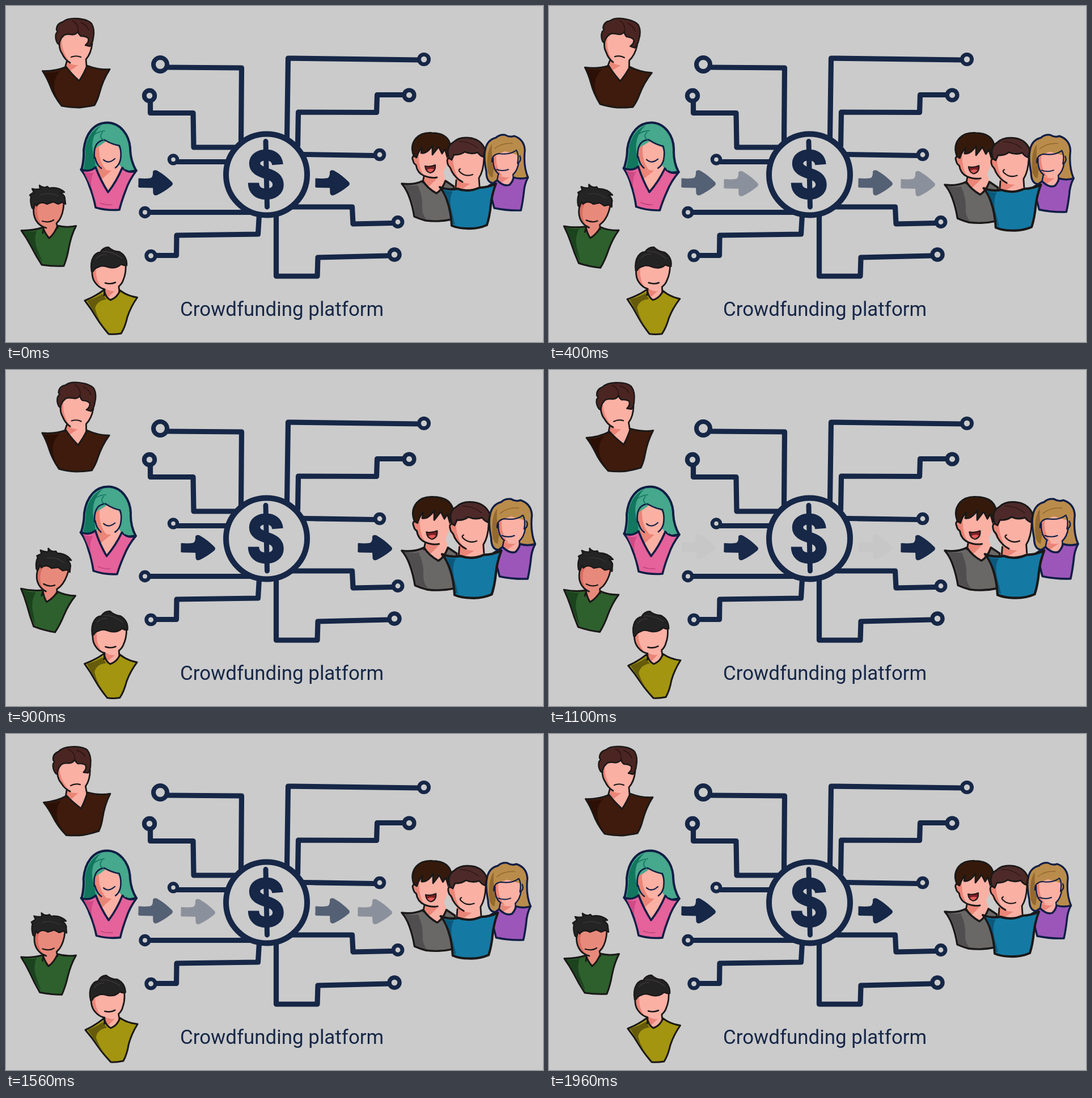
Animation of 947x592 px, one loop 2000 ms. Source, as an HTML page:

```html
<!DOCTYPE html>
<html lang="en">
<head>
<meta charset="utf-8">
<title>Crowdfunding platform</title>
<style>
html, body { margin: 0; width: 100%; height: 100%; overflow: hidden; background: #cbcbcb; }
svg { display: block; width: 947px; height: 592px; }
text { font: 34.9px Roboto, sans-serif; fill: #162747; }
</style>
</head>
<body>
<svg id="stage" viewBox="0 0 947 592"></svg>
<script>
const NAVY = '#162747', INK = '#1a1818', BG = '#cbcbcb', DEEP = '#101e45';
const SKIN = '#fbb0a4', BLUSH = '#ea8577';

const fill = (d, color) => `<path d="${d}" fill="${color}"/>`;
const line = (d, w = 2.8, color = INK) =>
  `<path d="${d}" fill="none" stroke="${color}" stroke-width="${w}"/>`;
const shape = (d, color, w = 3.4, ink = INK) =>
  `<path d="${d}" fill="${color}" stroke="${ink}" stroke-width="${w}"/>`;
const group = (id, ...parts) =>
  `<g id="${id}" stroke-linejoin="round" stroke-linecap="round">${parts.join('')}</g>`;

// Circuit: x, y, outer radius, ring width, then the wire
const wires = [
  [272, 103, 16, 8, 'M284 108L415.5 109L414.5 240'],
  [253, 158, 13.2, 8, 'M254.5 168V188.5H330L331 249H406'],
  [295, 270.5, 10.3, 6.5, 'M303 274.5H390'],
  [245, 363.5, 10.7, 6.7, 'M254 363.5H432'],
  [255.5, 440, 11.2, 6.7, 'M265 439.5H300.5L301 404L444.5 402L446.5 368'],
  [737, 94, 12, 6.8, 'M727 95L497.5 92L495.5 232'],
  [711, 157, 12.6, 7.5, 'M700 156.5H654.5L653.5 187.5L515.5 187L514.5 246'],
  [659, 262, 11.2, 6.8, 'M649 263.5L524 261.5'],
  [691, 380.5, 11.4, 7, 'M681 382.5L612 384L610.5 354H506'],
  [685, 438, 12.7, 7.4, 'M674 440L550 443L549 476H476.5V368']
];
const circuit = group('circuit',
  ...wires.map(w => line(w[4], 9.2, NAVY)),
  ...wires.map(([x, y, r, w]) =>
    `<circle cx="${x}" cy="${y}" r="${r - w / 2}" fill="${BG}" stroke="${NAVY}" stroke-width="${w}"/>`),
  `<circle cx="459.5" cy="297" r="71.5" fill="${BG}" stroke="${NAVY}" stroke-width="10"/>`,
  `<path d="M479 279.500C478 268 470 262.500 459 262.500C446 262.500 438.500 269 438.500 277.500C438.500 287 447 291 459 295C472 299 480 304 480 315C480 325 471 331.500 458.500 331.500C445 331.500 436.500 324 436.500 311.500" fill="none" stroke="${NAVY}" stroke-width="19.5" stroke-linecap="butt"/>`,
  line('M458 238.500L460.500 354', 9, NAVY));

const arrow = (cls, x, y) => `<path class="${cls}" transform="translate(${x} ${y})"
  fill="${NAVY}" stroke="${NAVY}" stroke-width="2" stroke-linejoin="round"
  d="M1 15.500Q14 16.500 22 15Q27 13 26.500 3Q28 0 33 2Q47 10 58 21.500Q61 24 58 27Q46 37 33 43Q28 45 27 41L26.500 30.500L2 30Q0 30 1 26Z"/>`;
const arrows = arrow('near', 233.5, 289) + arrow('far', 308.5, 290.5) +
  arrow('near', 545.5, 289) + arrow('far', 620.5, 290.5);

const brown = group('brown',
  fill('M107 92L103 112L128 132L144 106L141 90Z', SKIN),
  fill('M107 97Q116 105 127 104L110 117L104 110Z', BLUSH),
  shape('M64.500 114.500Q88 115 106 107Q114 118 129 132Q138 118 143 105Q164 113 183 111.500Q171 130 165 153Q162 165 156 175Q141 178 129 179Q112 179 98 176Q84 158 78 141Q72 126 64.500 114.500Z', '#3e1b0c', 2.8),
  fill('M68 117Q84 118 96 114Q82 128 86 150Q91 166 99 174Q87 162 80 142Z', '#2c1006'),
  fill('M93 52Q91 74 98 84Q105 98 122 103Q138 101 146 88Q152 76 153 52L128 40Z', SKIN),
  fill('M92 60Q92 74 98 84Q104 95 113 100Q101 84 99 68L98 54Z', BLUSH),
  line('M94 66Q94 77 99 84Q104 95 113 100M152 66Q150 84 141 94L142 106M107 98L104 109'),
  shape('M91 66Q86 58 88 49L91 45L89 42Q89 31 100 28Q108 21 124 22Q144 23 151 31Q157 41 154 56Q153 66 148 71L140 69Q147 63 145 57Q141 53 132 53Q128 50 127 45Q123 52 113 50Q104 49 101 53Q95 58 94 68Z', '#4a2521', 2.4),
  line('M117 26Q129 32 127 45M132 29Q142 33 146 42', 1.4, '#2b1210'),
  line('M115 90Q124 86.500 132 90', 2.2));

const pink = group('pink',
  shape('M133 289Q138 270 137 254C140 225 155 205.500 179 205.500C201 206 217 226 219 250Q219 272 229.500 290L205 294H154Z', '#46a88c', 4, DEEP),
  fill('M137 287Q141 266 140 252Q144 222 168 210Q147 231 154 262Q159 275 157 290L140 290Z', '#12775f'),
  fill('M164 276L157 292L180 329L206 288L196 274Z', SKIN),
  fill('M162 281Q173 290 186 290L166 308L158 294Z', BLUSH),
  shape('M132 288Q147 294 158 284Q167 308 180 328Q195 309 205 285Q216 296 230 290Q217 307 211 325Q204 343 200 359Q178 361 158 355Q154 334 147 317Q142 301 132 288Z', '#e5629b', 3.6, DEEP),
  fill('M137 292Q148 296 155 293Q147 307 152 327L160 352Q155 333 149 317Z', '#cf4a86'),
  fill('M157 252Q156 270 165 281Q173 290 184 289Q199 283 203 264Q202 243 180 236Z', SKIN),
  fill('M157 252Q155 270 165 281Q172 289 177 289Q163 274 164 246Z', BLUSH),
  shape('M155 256Q156 240 173 236Q187 245 201 246Q205 256 202 272L210 288Q215 270 213 250Q210 222 184 212Q157 218 155 256Z', '#46a88c', 1, '#46a88c'),
  line('M156 268Q154 249 162 241Q168 236 174 236Q187 244 200 246Q204 256 202 270Q200 280 193 285M157 267Q160 280 168 286', 2.6, DEEP),
  line('M147 240Q153 222 174 220M172 236Q163 231 170 223', 1.7, '#12775f'),
  line('M172 271Q181 279 192 269', 2.2, DEEP),
  line('M166 347Q174 351 187 350', 1.2, '#b83a75'));

const green = group('green',
  fill('M65 382L64 398L76 410L91 393L88 380Z', '#e88a7b'),
  shape('M27 395.500Q47 396 65 390Q69 401 76 409Q85 402 91 387Q106 391 123.500 387.500Q115 404 111 425Q108 443 102 458Q82 459 63 456Q52 439 44 423Q36 408 27 395.500Z', '#2d602d', 3),
  fill('M30 397Q45 399 54 396Q49 410 54 426L65 452Q54 439 46 423Z', '#1b431d'),
  fill('M48 344Q47 360 51 373Q57 387 71 391Q87 389 95 376Q102 363 103 346L80 334Z', '#e88a7b'),
  fill('M48 346Q47 361 51 373Q56 384 66 389Q55 377 55 360L58 345Z', '#d96d60'),
  line('M49 352Q47 368 53 378Q59 388 71 391M94 377Q101 366 102 348M66 391L65 400M94 377L89 383L91 391'),
  shape('M46 356Q42 345 44 336L42 333L49 328L46 322Q54 324 60 322L59 316Q66 322 73 318L76 321Q92 318 103 328L96 329Q105 334 104 341L105 349L99 346L92 349L83 345L72 349Q61 343 54 352L51 348L49 358Z', '#242425', 2.4),
  line('M60 333Q76 327 92 335', 1.2, '#383838'),
  line('M64 379Q76 382.500 84 377', 2.3));

const yellow = group('yellow',
  fill('M174 490L172 508L183 519L200 505L198 488Z', SKIN),
  fill('M174 497Q184 504 192 502L179 514L172 507Z', BLUSH),
  shape('M139 519Q157 512 173 500Q175 513 184 518Q196 514 201 501Q214 511 231.500 513.500Q220 530 214 548Q210 566 203 577Q191 579 181 578Q168 563 160 550Q150 533 139 519Z', '#a3950f', 3),
  fill('M143 519Q158 515 170 507L177 517Q160 519 157 533Q163 557 181 574Q169 563 161 549Z', '#655b0b'),
  fill('M152 456Q149 474 156 487Q165 499 180 500Q198 497 206 485Q212 473 211 450L180 444Z', SKIN),
  fill('M152 458Q149 474 156 487Q162 495 170 498Q158 484 159 464L164 454Z', BLUSH),
  line('M152 465Q151 479 157 487Q164 497 174 499M199 494Q205 489 207 482Q212 470 211 455M174 500L173 510M199 495L200 504'),
  shape('M151 468Q148 452 154 442Q159 434 166 434Q171 425 181 425Q188 432 200 433Q214 441 213 457Q208 458 203 455Q194 464 180 460Q169 456 163 460Q156 462 154 467Z', '#242323', 2.4),
  line('M170 433Q186 431 204 444M159 445Q166 437 176 438', 1.3, '#3d3938'),
  line('M175 488Q185 491 193 487', 2.6));

const grey = [
  fill('M737 290L735 312L758 330L778 316L770 290Z', SKIN),
  fill('M738 298Q748 305 760 304L746 318L735 312Z', BLUSH),
  shape('M698 313Q719 316 735 308Q743 321 759 330Q769 324 775 308L790 318L786 376Q763 381 740 378Q729 375 720 371Q717 352 711 336Q706 322 698 313Z', '#696867'),
  fill('M702 315Q717 318 726 316Q735 335 734 352Q733 368 742 376L722 370Q719 345 710 329Z', '#504e4e'),
  fill('M722 256Q712 262 721 278Q724 294 738 300Q754 305 766 299Q780 286 780 250L748 240Z', SKIN),
  fill('M722 258Q712 262 721 278Q724 292 737 299Q727 284 728 258Z', BLUSH),
  line('M722 264Q714 264 718 273Q719 278 723 280Q725 294 737 299Q749 304 760 302M737 300L735 311'),
  shape('M719 264Q712 246 723 233Q733 222 751 223.500Q778 224 783 243Q785 255 779 269L774 252L769 260L763 248L752 262L752 246Q742 261 732 259L734 249Q727 256 724 267Z', '#351a0b', 2.8),
  shape('M739 282Q748 284 757 280Q758 292 748 294Q740 292 739 282Z', '#7b1f25', 2),
  fill('M742 289Q748 285 755 288Q751 293 747 293Z', '#e05a58')
];
const blonde = [
  shape('M847 292Q842 267 845 254Q848 236 864 232Q870 226 880 227Q888 232 896 229Q914 235 915 254Q912 282 920.500 302Q910 307 900 304L862 312Q847 313 847 292Z', '#ba8c4b', 3.2, DEEP),
  fill('M849 285Q847 256 857 243Q855 266 861 282L858 302Q850 300 849 285Z', '#93692f'),
  fill('M868 290L864 313L879 323L898 308L893 290Z', SKIN),
  fill('M869 298Q879 304 889 301L871 313L865 309Z', BLUSH),
  shape('M851 317Q860 312 866 307Q878 319 888 315Q894 309 895 302Q908 306 920.500 302Q914 314 913 330Q911 347 908 360Q885 361 861 356Z', '#9c56b9', 3.4, DEEP),
  fill('M858 264Q855 282 865 294Q877 303 891 299Q904 291 904 263L880 256Z', SKIN),
  fill('M858 264Q855 282 865 294Q870 299 876 300Q862 284 865 260Z', BLUSH),
  line('M859 268Q858 288 869 296M894 297Q902 290 904 276M868 297L866 307M894 297L895 304', 2.4, DEEP),
  line('M857 275Q856 262 869 260Q889 263 900 254Q905 262 902 277Q910 273 906 264', 2.2, DEEP),
  line('M862 251Q874 241 893 242', 1.5, '#93692f'),
  line('M865 288Q876 292 886 288', 2, DEEP)
];
const blue = [
  fill('M793 295L791 322Q814 334 836 318L835 292Z', SKIN),
  fill('M794 304Q805 313 819 313L800 325L791 321Z', BLUSH),
  shape('M765 319Q780 325 796 322Q815 329 835 320Q850 320 864 313Q857 331 855 350Q853 371 848 386Q832 393 813 392Q798 392 786 387Q785 363 778 343Q773 328 765 319Z', '#147aa4', 4),
  fill('M771 324Q781 327 788 326Q781 338 785 357L792 385L788 384Q787 360 779 340Z', '#0b587c'),
  fill('M784 263Q773 267 780 283Q788 301 801 308Q818 316 833 303Q844 289 843 255L814 246Z', SKIN),
  fill('M784 265Q773 268 780 283Q787 300 800 307Q788 289 788 263Z', BLUSH),
  line('M783 268Q775 268 780 281Q784 284 786 291Q793 304 805 310M834 303Q842 291 843 268M794 307L793 320M834 303L835 317'),
  shape('M781 268Q775 247 789 240Q800 229 822 233Q839 237 845 253L842 266Q836 264 832 258Q820 262 809 257Q801 263 790 262L786 271Z', '#4d2a29', 2.8),
  line('M799 239Q816 238 831 250', 1.4, '#301716'),
  line('M801 287Q797 289 800 292Q810 302 823 297', 2.2)
];

document.getElementById('stage').innerHTML =
  `<rect width="947" height="592" fill="${BG}"/>` + circuit + arrows +
  brown + pink + green + yellow + group('team', ...grey, ...blonde, ...blue) +
  '<text x="307" y="546">Crowdfunding platform</text>';

// Each figure: pivot, then [progress, degrees] keys
const swings = {
  brown: [123.5, 100, [[0, 0], [1 / 3, 9], [2 / 3, -9], [1, 0]]],
  pink: [181, 272, [[0, 0], [1 / 3, 4.5], [2 / 3, -1.5], [1, 0]]],
  green: [75, 388, [[0, 0], [1 / 3, 13.4], [1, 0]]],
  yellow: [185, 502, [[0, 0], [1 / 3, 4.5], [2 / 3, -4.5], [1, 0]]]
};
const ease = x => (1 - Math.cos(Math.PI * x)) / 2;
const clamp = x => Math.min(1, Math.max(0, x));
const at = (keys, p) => {
  const i = Math.max(1, keys.findIndex(k => k[0] >= p));
  const [t0, a] = keys[i - 1], [t1, b] = keys[i];
  return a + (b - a) * ease((p - t0) / (t1 - t0));
};
const el = id => document.getElementById(id);
const near = document.querySelectorAll('.near'), far = document.querySelectorAll('.far');

function draw(now) {
  // 60 steps per loop, starting on whole hundredths of a second
  const t = Math.floor((now % 2000) / 10) * 10;
  const p = Math.floor((t + 9.99) * 0.03) / 59;
  for (const id in swings) {
    const [x, y, keys] = swings[id];
    el(id).setAttribute('transform', `rotate(${at(keys, p)} ${x} ${y})`);
  }
  const mix = ease(2 * p), s = 1 + 0.058 * mix;
  el('team').setAttribute('transform', `translate(697 222) scale(${s}) translate(-697 -222)`);
  // The fade rests briefly at both ends
  const fade = clamp(mix * 1.04 - 0.02);
  near.forEach(a => a.setAttribute('opacity', 1 - fade));
  far.forEach(a => a.setAttribute('opacity', fade));
}
function tick() {
  draw(performance.now());
  requestAnimationFrame(tick);
}
tick();
</script>
</body>
</html>
```
